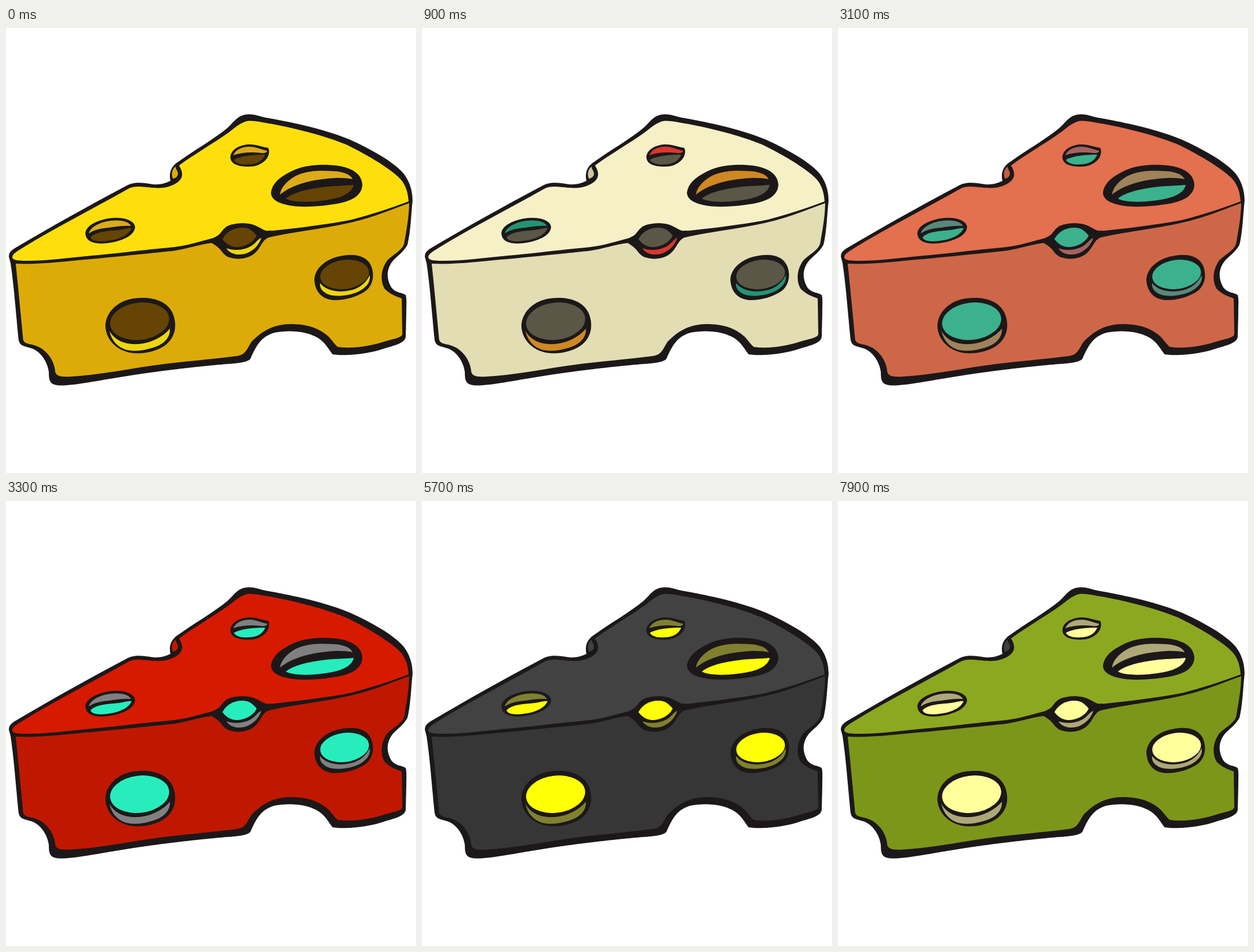
An HTML page without scripts for the animation above (8000 ms loop, 718x780 px).

```html
<!DOCTYPE html>
<html lang="en">
<head>
<meta charset="utf-8">
<title>Cheese colours</title>
<style>
  html, body { margin: 0; width: 100%; height: 100%; overflow: hidden; background: #fff; }
  svg { display: block; width: 100%; height: 100%; }

  /* Each part carries five colours, --a to --e, and steps through them. */
  path, ellipse { fill: #1c1819; }
  [class] { animation: recolour 8s infinite; }

  .top   { --a: #fedf0b; --b: #f6f0c6; --c: #d61a00; --d: #424242; --e: #8ca820; }
  .side  { --a: #dcab08; --b: #e3ddb4; --c: #c01800; --d: #363636; --e: #7c961a; }
  .notch { --a: #dcab08; --b: #cbc6a0; --c: #c01800; --d: #404040; --e: #404040; }
  .hole  { --a: #654404; --b: #5b5746; --c: #27edbd; --d: #ffff05; --e: #ffff9c; }
  .rim   { --a: #dcab1a; --c: #808080; --d: #80802f; --e: #aea878; }
  .low   { --a: #ecd60c; }
  .red    { --b: #d83830; }
  .orange { --b: #d08822; }
  .green  { --b: #229573; }

  @keyframes recolour {
    0%     { fill: var(--a); }
    6.25%  { fill: var(--a); animation-timing-function: steps(5, jump-start); }
    12.5%  { fill: var(--b); }
    36.25% { fill: var(--b); animation-timing-function: steps(5, jump-start); }
    42.5%  { fill: var(--c); }
    66.25% { fill: var(--c); animation-timing-function: steps(5, jump-start); }
    72.5%  { fill: var(--d); }
    96.25% { fill: var(--d); animation-timing-function: steps(3, jump-start); }
    100%   { fill: var(--e); }
  }
</style>
</head>
<body>
<svg viewBox="0 0 718 780">
  <!-- silhouette -->
  <path d="M5 401C5 393 9 390 17 385C80 348 140 314 210 277C226 268 240 272 258 274C270 275 279 272 288 268
    C285 256 288 243 301 235C330 214 364 195 388 175C398 166 404 155 418 152C434 149 445 156 460 158
    C500 165 560 178 603 196C640 213 680 235 697 256C708 271 712 287 712 303C709 330 709 355 703 380
    C697 392 683 401 676 410C666 424 666 440 675 455C683 465 693 463 700 468C702 475 701 485 701 500L700 541
    C699 552 682 556 665 561C640 570 600 576 572 572C564 562 558 548 540 540C520 530 490 530 470 534
    C445 541 437 560 428 580C420 588 395 588 375 590C330 594 260 602 200 612C160 618 110 629 89 626
    C76 624 75 616 75 603C73 586 61 566 43 561C30 557 24 557 22 546C18 510 15 460 8 412Z"/>

  <!-- faces -->
  <path class="top" d="M11 402C11 396 20 391 28 386C90 348 150 318 212 283C225 275 240 279 258 280
    C278 282 291 277 301 270C311 262 310 252 303 241C330 221 362 203 390 183C402 174 410 166 423 163
    C438 162 455 167 470 169C510 177 555 188 595 204C630 221 670 244 690 264C701 276 704 290 705 304
    C670 317 640 327 605 336C560 345 500 352 458 356C448 354 440 345 425 343C408 341 392 344 383 352
    C376 360 370 367 356 370C330 377 310 383 285 385C240 389 200 395 150 399C110 403 70 408 40 408
    C25 408 12 408 11 402Z"/>
  <path class="side" d="M17 413C60 415 100 409 150 405C200 400 250 395 290 391C320 387 345 377 362 377
    C373 380 376 394 388 401C404 407 422 405 434 396C446 386 448 371 460 367C500 358 540 354 585 345
    C630 337 670 320 706 307C706 330 701 356 697 379C692 391 679 396 668 407C656 423 655 444 663 457
    C673 467 682 470 693 474L694 536C694 543 678 545 668 548C640 557 610 563 581 559
    C573 553 570 543 556 534C540 523 520 519 497 519C462 520 444 536 430 550C422 562 420 573 404 575
    C360 581 310 584 262 591C210 598 160 609 113 611C95 612 86 610 86 600
    C84 583 72 565 55 558C44 553 32 555 30 546C26 505 22 460 17 413Z"/>
  <path class="notch" d="M292 264C289 256 291 247 297 243C298 250 302 251 301 257C300 261 296 264 292 264Z"/>

  <!-- holes in the top -->
  <path d="M393 227C393 214 408 205 425 204C440 204 450 209 459 210C463 216 460 227 453 233C445 240 436 243 425 243C407 243 394 239 393 227Z"/>
  <path class="rim red" d="M398 223C402 213 414 208 426 208C438 208 446 213 457 215C458 218 453 220 446 219C430 217 412 218 398 223Z"/>
  <path class="hole" d="M399 231C412 224 432 222 454 222C449 234 438 239 424 239C412 240 402 237 399 231Z"/>

  <path d="M464 288C467 270 482 260 500 251C520 241 545 239 565 240C595 241 622 250 624 274C624 292 608 303 580 308C555 312 525 315 503 312C482 309 464 303 464 288Z"/>
  <path class="rim orange" d="M480 292C481 279 496 263 515 256C535 249 555 250 575 251C592 252 603 257 607 265C585 260 560 264 540 267C518 271 494 280 480 292Z"/>
  <path class="hole" d="M490 299C503 288 530 282 555 279C573 276 594 277 609 275C606 288 592 295 575 299C548 305 506 308 490 299Z"/>

  <path d="M139 359C141 346 158 338 178 334C200 330 225 335 226 349C225 362 210 370 190 375C168 380 139 380 139 359Z"/>
  <path class="rim green" d="M145 360C148 348 166 340 182 338C198 336 214 338 219 347C206 346 193 348 180 350C165 351 154 354 145 360Z"/>
  <path class="hole" d="M148 367C158 356 180 356 198 354C207 353 213 350 220 351C215 362 204 367 190 371C175 374 152 377 148 367Z"/>

  <!-- hole on the edge -->
  <path d="M358 371C374 368 377 353 388 347C402 341 424 341 434 346C444 352 449 357 464 355L464 366C451 368 448 380 441 389C430 403 414 405 402 404C382 402 377 384 358 376Z"/>
  <path class="hole" d="M379 370C386 357 398 351 411 350C425 349 432 355 439 364C432 378 416 384 404 384C393 384 384 377 379 370Z"/>
  <path class="rim low red" d="M386 386C402 392 424 389 436 377C440 373 443 369 447 368C443 381 432 392 418 396C405 399 392 396 386 386Z"/>

  <!-- holes in the side -->
  <path d="M540 441C541 420 562 403 590 399C612 395 632 400 639 416C646 432 643 450 631 460C616 471 595 477 575 477C553 476 541 462 540 441Z"/>
  <ellipse class="hole" cx="593" cy="432" rx="43" ry="25.5" transform="rotate(-8 593 432)"/>
  <path class="rim low green" d="M550 447C563 464 590 464 610 458C625 452 632 443 637 433C639 445 631 456 615 463C598 470 575 472 562 466C553 461 549 455 550 447Z"/>

  <path d="M174 522C175 497 196 478 224 474C256 470 282 478 292 500C301 522 296 545 276 558C260 568 240 571 225 570C196 568 175 548 174 522Z"/>
  <ellipse class="hole" cx="234" cy="514" rx="52" ry="32.5" transform="rotate(-7 234 514)"/>
  <path class="rim low orange" d="M181 531C193 551 213 555 232 554C256 552 275 541 287 527C288 542 278 552 264 558C246 565 226 568 210 564C195 559 185 548 181 531Z"/>
</svg>
</body>
</html>
```
